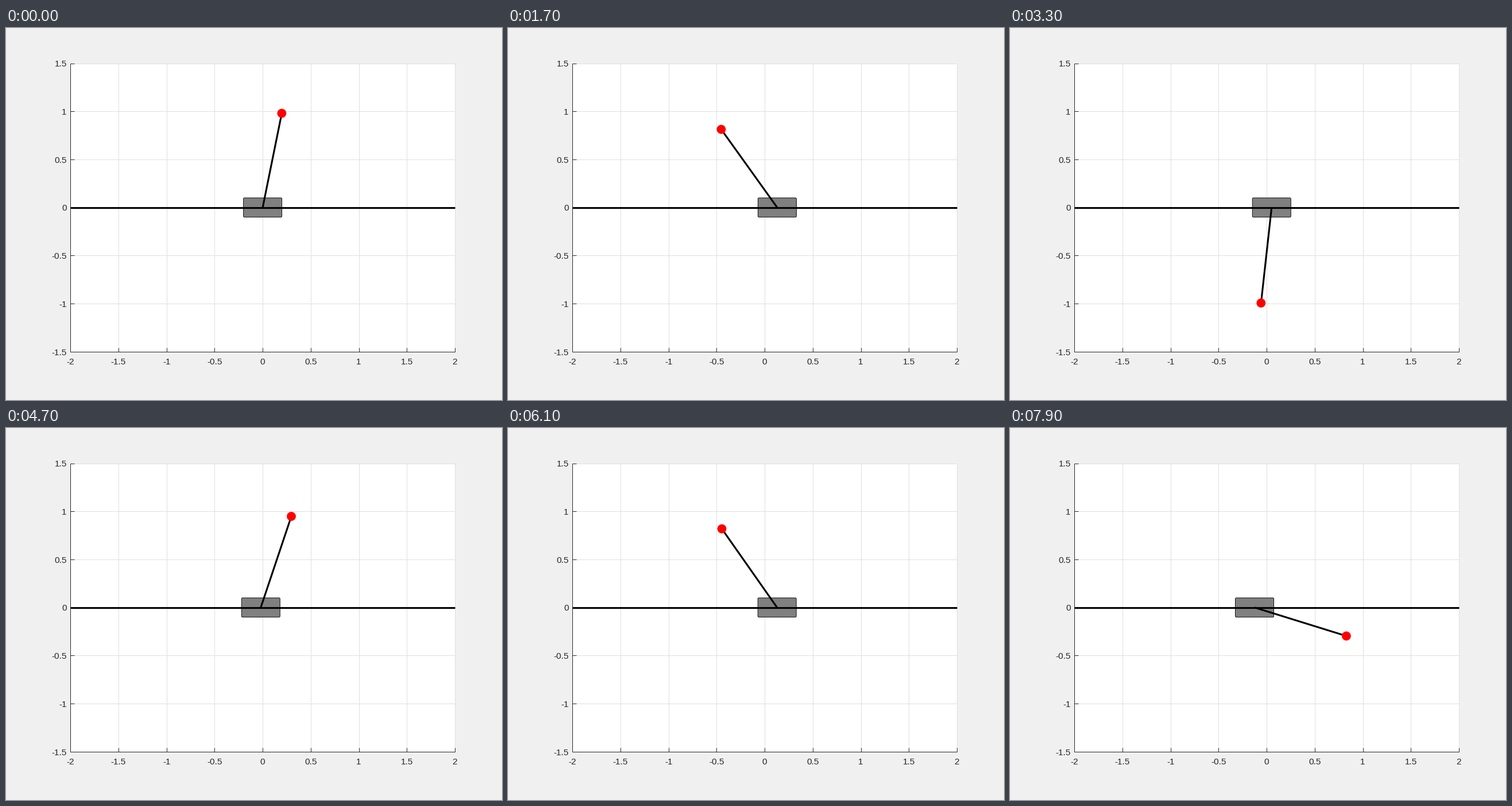
A matplotlib script that plays this animation: 864x648 px, repeating every 8 s.

```python
import numpy as np
import matplotlib.pyplot as plt
from matplotlib.animation import FuncAnimation
from matplotlib.patches import Circle, FancyBboxPatch

W, H, DPI = 864, 648, 100
FRAMES, STEP_MS = 80, 100
PT = 72 / DPI                       # points per pixel

G, MASS_RATIO = 9.81, 1 / 6         # bob mass over total mass
REST = [0.2, 0.212, 0.214, 0.219, 0.222]   # angle from upright at each turn
CART_W, CART_H = 0.4, 0.2

LEFT, BOTTOM, AX_W, AX_H = 112.32, 84.24, 669.6, 502.2
INK, GRID = "#262626", "#dfdfdf"


def accel(a, w):
    s, c = np.sin(a), np.cos(a)
    return s * (G - MASS_RATIO * c * w * w) / (1 - MASS_RATIO * c * c)


def fall(a, dt=0.002):
    """Times and angles of a fall from rest at angle a to the bottom."""
    w, angles = 0.0, [a]
    while a < np.pi:
        k1, l1 = w, accel(a, w)
        k2, l2 = w + dt / 2 * l1, accel(a + dt / 2 * k1, w + dt / 2 * l1)
        k3, l3 = w + dt / 2 * l2, accel(a + dt / 2 * k2, w + dt / 2 * l2)
        k4, l4 = w + dt * l3, accel(a + dt * k3, w + dt * l3)
        a += dt / 6 * (k1 + 2 * k2 + 2 * k3 + k4)
        w += dt / 6 * (l1 + 2 * l2 + 2 * l3 + l4)
        angles.append(a)
    return np.arange(len(angles)) * dt, np.array(angles)


# Each swing rises and falls symmetrically about its turning time.
falls = [fall(a) for a in REST]
quarter = [np.interp(np.pi, angles, times) for times, angles in falls]
turns = np.cumsum([0] + [p + q for p, q in zip(quarter, quarter[1:])])


def pose(t):
    k = next(i for i in range(len(REST))
             if t <= turns[i] + quarter[i] or i == len(REST) - 1)
    angle = (-1) ** k * np.interp(abs(t - turns[k]), *falls[k])
    x = MASS_RATIO * (np.sin(REST[0]) - np.sin(angle))
    return x, x + np.sin(angle), np.cos(angle)


fig = plt.figure(figsize=(W / DPI, H / DPI), dpi=DPI, facecolor="#f0f0f0")
ax = fig.add_axes([LEFT / W, BOTTOM / H, AX_W / W, AX_H / H])
ax.set(xlim=(-2, 2), ylim=(-1.5, 1.5), xticks=[], yticks=[])
for spine in ax.spines.values():
    spine.set_visible(False)

UNIT = AX_W / 4                     # pixels per data unit
TICK = 6.7 / UNIT


def line(xs, ys, color, px, z):
    return ax.plot(xs, ys, color=color, lw=px * PT, zorder=z, clip_on=False,
                   solid_capstyle="butt")[0]


def label(x, y, value, ha):
    fig.text(x / W, y / H, f"{value:g}", ha=ha, va="baseline", color=INK,
             family="Liberation Sans", size=15.43 * PT)


for v in np.arange(-2, 2.1, 0.5):
    line([v, v], [-1.5, 1.5], GRID, 1, 1)
    line([v, v], [-1.5, -1.5 + TICK], INK, 1, 2)
    label(LEFT + (v + 2) * UNIT, 62.5, v, "center")
for v in np.arange(-1.5, 1.6, 0.5):
    line([-2, 2], [v, v], GRID, 1, 1)
    line([-2, -2 + TICK], [v, v], INK, 1, 2)
    label(105.8, BOTTOM + (v + 1.5) * UNIT - 5.8, v, "right")
line([-2, -2], [-1.5, 1.5], INK, 1, 2)
line([-2, 2], [-1.5, -1.5], INK, 1, 2)

cart = FancyBboxPatch((0, -CART_H / 2), CART_W, CART_H,
                      boxstyle="round,pad=0,rounding_size=0.01",
                      fc="#808080", ec="black", lw=0.9 * PT, zorder=3)
ax.add_patch(cart)
line([-2, 2], [0, 0], "black", 3.1, 4)
rod = line([0, 0], [0, 1], "black", 3.1, 5)
bob = ax.add_patch(Circle((0, 1), 7.9 / UNIT, fc="red", ec="none", zorder=6))


def draw(i):
    x, bx, by = pose(i * STEP_MS / 1000)
    cart.set_x(x - CART_W / 2)
    rod.set_data([x, bx], [0, by])
    bob.center = bx, by
    return cart, rod, bob


anim = FuncAnimation(fig, draw, frames=FRAMES, interval=STEP_MS, repeat=True)
plt.show()
```
